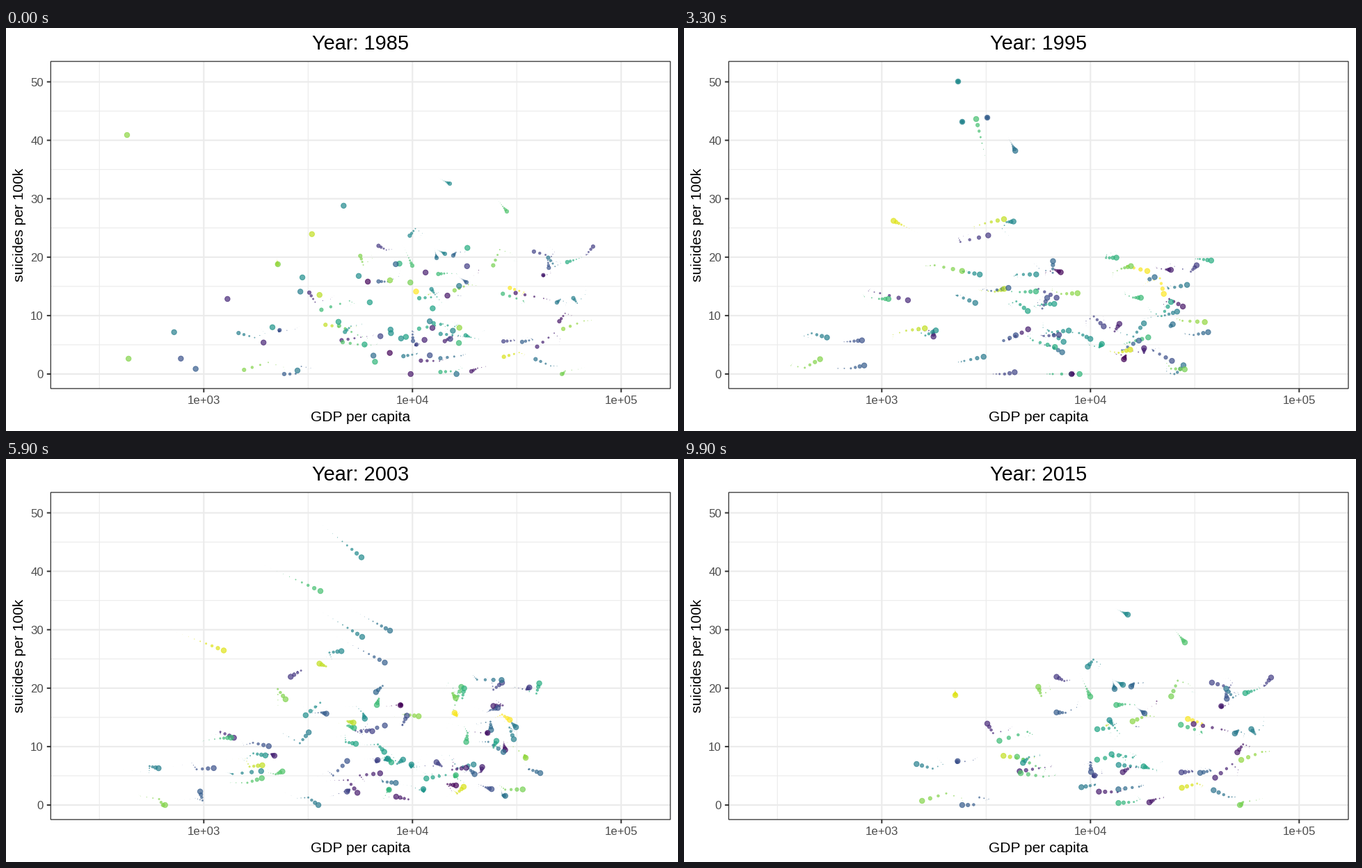
Animation of 966 by 580 pixels, one loop 10000 ms. Source, as a matplotlib script:

```python
import numpy as np
import matplotlib.pyplot as plt
from matplotlib.animation import FuncAnimation
from matplotlib.patches import Rectangle

W, H, DPI = 966, 580, 100
PX = 72 / DPI                      # points per pixel
FRAMES, WAKE = 100, 10
FIRST, LAST = 1985, 2015
X0, Y0, DECADE, TEN = 284.3, 498, 300, 84.1
TIME = np.arange(FRAMES)
KNOTS = np.round(np.linspace(0, FRAMES - 1, LAST - FIRST + 1))  # one per year

# Outlying paths: colour, then a few (frame, x, y) points.
OUTLIERS = [
    (0.48, (33, 394, 77), (50, 449, 90), (68, 573, 193), (99, 638, 224)),
    (0.70, (23, 441, 218), (33, 420, 131), (50, 372, 153), (68, 532, 227),
     (99, 584, 342)),
    (0.45, (33, 400, 135), (50, 449, 217), (68, 575, 295), (99, 631, 325)),
    (0.30, (33, 436, 129), (50, 476, 256), (68, 613, 330), (99, 662, 366)),
    (0.38, (23, 464, 153), (50, 497, 217), (68, 607, 277), (99, 619, 331)),
    (0.95, (23, 339, 296), (50, 237, 246), (68, 389, 305), (99, 390, 340)),
    (0.72, (50, 634, 387), (68, 675, 269), (82, 687, 223), (99, 720, 264)),
    (0.83, (0, 174, 154)),
]
# Shared drift of income in pixels, and the rich group's late start.
TREND = np.interp(TIME, [0, 28, 33, 50, 60, 68, 77, 94, 99],
                  [0, -28, 5, -8, 25, 75, 112, 138, 112])
CATCH_UP = -80 * np.clip(1 - TIME / 23, 0, 1)
RICH, COUNT = 24, 78

rng = np.random.default_rng(31)
cmap = plt.get_cmap("viridis")


def wander(step):
    """Piecewise linear noise that turns once a year."""
    n = len(KNOTS)
    noise = rng.normal(0, step, n) + np.cumsum(rng.normal(0, step / 2, n))
    return np.interp(TIME, KNOTS, noise - noise.mean())


def outlier(color, *points):
    when, x, y = np.transpose(points)
    live = (TIME >= when[0] - 6) & (TIME <= when[-1] + 3)
    return color, live, np.interp(TIME, when, x), np.interp(TIME, when, y)


def member(i):
    """Seeded path that follows the shared trend."""
    if i < RICH:
        base, rate = rng.normal(695, 32), rng.uniform(1.5, 22)
        shift = 0.75 * TREND + CATCH_UP
    else:
        base = np.clip(rng.normal(460, 115), 190, 655)
        rate = min(rng.gamma(1.5, 6), 26)
        shift = TREND * (1 + (460 - base) / 600)
    start = 0 if i % 5 < 3 else rng.integers(8, 45)
    end = FRAMES - 1 if i % 3 else rng.integers(84, 97)
    live = (TIME >= start) & (TIME <= end)
    x = base + shift + wander(8)
    y = Y0 - rate * TEN / 10 + wander(6)
    return rng.random(), live, x, np.minimum(y, Y0)


tracks = [outlier(*row) for row in OUTLIERS]
tracks += [member(i) for i in range(COUNT)]
hues, live, xs, ys = (np.array(part) for part in zip(*tracks))
colors = cmap(hues)
colors[:, 3] = 0.7

plt.rcParams["font.family"] = "Liberation Sans"
fig = plt.figure(figsize=(W / 100, H / 100), dpi=DPI, facecolor="white")
ax = fig.add_axes([0, 0, 1, 1])
ax.set_xlim(0, W)
ax.set_ylim(H, 0)
ax.axis("off")

LEFT, RIGHT, TOP, BOTTOM = 64.3, 955, 48.1, 518.9
GRID, DARK, GREY = "#ebebeb", "#333333", "#4d4d4d"


def line(x, y, color, width):
    ax.plot(x, y, color=color, lw=width * PX, zorder=1, snap=False,
            solid_capstyle="butt")


def label(x, y, s, size, color="black", ha="center", **kw):
    return ax.text(x, y, s, fontsize=size * PX, color=color, ha=ha,
                   va="baseline", **kw)


for i in range(3):
    x = X0 + i * DECADE
    line([x - DECADE / 2] * 2, [TOP, BOTTOM], GRID, 1.1)
    line([x, x], [TOP, BOTTOM], GRID, 2.1)
    line([x, x], [BOTTOM, BOTTOM + 5.5], DARK, 2)
    label(x, 541, f"1e+0{i + 3}", 16.8, GREY)
for i in range(6):
    y = Y0 - i * TEN
    if i < 5:
        line([LEFT, RIGHT], [y - TEN / 2] * 2, GRID, 1.1)
    line([LEFT, RIGHT], [y, y], GRID, 2.1)
    line([LEFT - 5.5, LEFT], [y, y], DARK, 2)
    label(54, y + 6, str(i * 10), 16.8, GREY, ha="right")
ax.add_patch(Rectangle((LEFT, TOP), RIGHT - LEFT, BOTTOM - TOP, fill=False,
                       ec=DARK, lw=1.3 * PX, zorder=5, snap=False))

label(509.5, 566, "GDP per capita", 21)
label(25, 283.5, "suicides per 100k", 21, rotation=90, rotation_mode="anchor")
title = label(509.5, 31, "", 29)
dots = ax.scatter([], [], zorder=3)


def draw(frame):
    ages = np.arange(WAKE)[::-1]
    when = (frame - ages) % FRAMES
    scale = np.repeat((1 - ages / WAKE) ** 3, len(tracks))
    seen = live[:, when].T.ravel()
    rgba = np.tile(colors, (WAKE, 1))[seen]
    xy = np.column_stack([xs[:, when].T.ravel(), ys[:, when].T.ravel()])
    scale = scale[seen]
    dots.set_offsets(xy[seen])
    dots.set_sizes((7.4 * scale * PX) ** 2, dpi=DPI)
    dots.set_linewidths(PX * np.maximum(scale, 0.2))
    dots.set_facecolors(rgba)
    dots.set_edgecolors(rgba)
    year = FIRST + frame * (LAST - FIRST) / (FRAMES - 1)
    title.set_text(f"Year: {round(year)}")
    return dots, title


anim = FuncAnimation(fig, draw, frames=FRAMES, interval=100, repeat=True,
                     repeat_delay=0)
plt.show()
```
